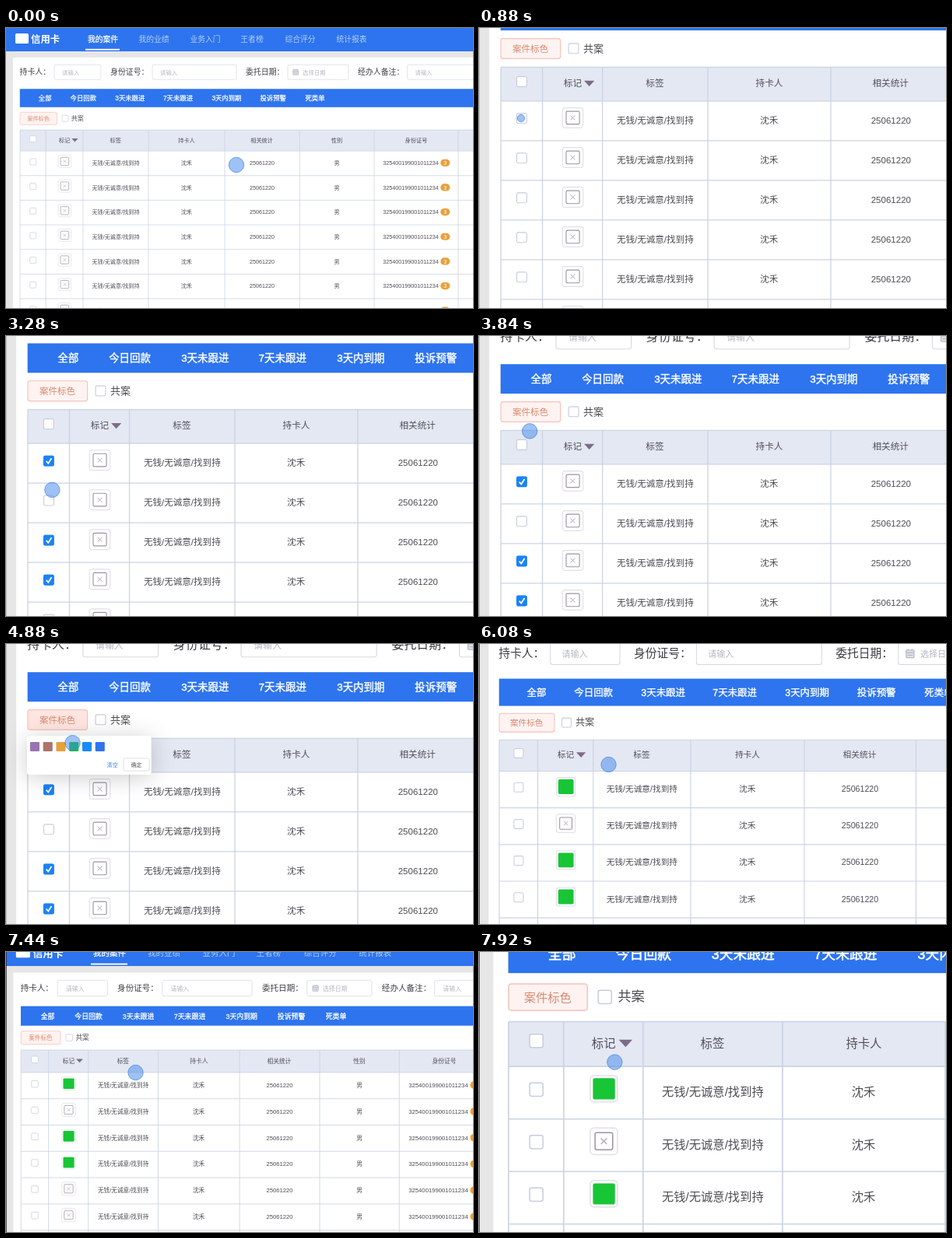
These frames come from a looping animation (600 by 360 pixels, 8 s). An HTML page:

```html
<!DOCTYPE html>
<html lang="zh-CN">
<head>
<meta charset="utf-8">
<style>
  html, body { margin: 0; width: 100%; height: 100%; overflow: hidden; background: #e6e6e6; }
  svg { display: block; width: 600px; height: 360px; }
  text { font-family: "Liberation Sans", "Noto Sans CJK SC", "Noto Sans CJK", sans-serif; white-space: pre; }
  #popup { filter: drop-shadow(0 2px 9px rgba(0, 0, 0, .2)); }
</style>
</head>
<body>
<svg id="stage" viewBox="0 0 600 360"></svg>
<script>
const LOOP = 8000, STEP = 80;
const BLUE = '#2d74ee', LINE = '#cbd3e4', GREEN = '#18c536';
const COLS = [18, 51.2, 99, 183, 281, 377.3, 473, 581];
const HEAD = 131.1, BODY = 158.1, ROW = 31.65, ROWS = 7;
const CHECKED = { 0: 900, 2: 2000, 3: 2680 };
const POPUP_OPEN = 4100, CONFIRM = 5860;

// Markup helpers
const rect = (x, y, w, h, fill, more = '') =>
  `<rect x="${x}" y="${y}" width="${w}" height="${h}" fill="${fill}" ${more}/>`;
const box = (x, y, w, h, r, stroke, fill = '#fff', sw = .7) =>
  rect(x, y, w, h, fill, `rx="${r}" stroke="${stroke}" stroke-width="${sw}"`);
const path = (d, stroke, sw) => `<path d="${d}" fill="none" stroke="${stroke}" stroke-width="${sw}"/>`;
const label = (s, x, y, size, fill, anchor = 'start', more = '') =>
  `<text x="${x}" y="${y + size * .37}" font-size="${size}" fill="${fill}" text-anchor="${anchor}" ${more}>${s}</text>`;
const mid = (s, x, y, size, fill, more) => label(s, x, y, size, fill, 'middle', more);
// Medium weight: a regular face with a hairline outline
const medium = color => `stroke="${color}" stroke-width=".25"`;
const tickbox = (x, y) => box(x - 4, y - 4, 8, 8, 1.2, '#c6cddd');

function header() {
  const nav = [['我的案件', 124.5], ['我的业绩', 190], ['业务入门', 256], ['王者榜', 316], ['综合评分', 378], ['统计报表', 444]];
  return rect(0, 0, 600, 30, BLUE) + rect(12, 7, 17, 13, '#fff', 'rx="1.5"') +
    label('信用卡', 32, 14, 12.4, '#fff', 'start', 'font-weight="700"') +
    nav.map(([s, x], i) => mid(s, x, 14, 9.8, i ? '#b4cffa' : '#fff', i ? '' : medium('#fff'))).join('') +
    rect(102, 26.8, 44, 1.8, '#fff');
}

function filters() {
  const fields = [
    ['持卡人：', 17.5, 62, 60, '请输入', 72], ['身份证号：', 134, 188, 108, '请输入', 198],
    ['委托日期：', 308, 362, 78, '选择日期', 381], ['经办人备注：', 452, 515.5, 100, '请输入', 525.5]];
  return fields.map(([name, x, bx, w, hint, hx]) =>
    label(name, x, 55.9, 9.9, '#3c3c44') + box(bx, 47.2, w, 19, 2, '#d5d9e3') +
    label(hint, hx, 56.8, 7.4, '#b4b8c2')).join('') +
    box(368.8, 53.6, 6.8, 6.6, .6, '#b4b8c2', '#dfe2e8', .8) +
    path('M368.8 55.8h6.8M370.6 52.6v1.6M373.8 52.6v1.6M370 58h4.4', '#b4b8c2', .8);
}

function toolbar() {
  const tabs = [['全部', 50.2], ['今日回款', 99.3], ['3天未跟进', 159.3], ['7天未跟进', 221], ['3天内到期', 283.4], ['投诉预警', 343.2], ['死类单', 397]];
  return rect(17.8, 78.3, 590, 23.5, BLUE) +
    tabs.map(([s, x]) => mid(s, x, 90.1, 8.35, '#fff', medium('#fff'))).join('') +
    rect(18, 108.3, 47.5, 16, '#fff3f1', 'id="mark" rx="1.8" stroke="#f6c0b8" stroke-width=".7"') +
    mid('案件标色', 41.6, 116.4, 7.15, '#d88a70') +
    tickbox(76, 116.2) + label('共案', 83.7, 115.8, 8.1, '#4a4a50');
}

function row(i) {
  const y = BODY + i * ROW, ty = y + 15.2, c = '#4d4d55';
  const x0 = 75.4, y0 = y + 13.4;
  return tickbox(34.7, y + 13.9) +
    `<g id="on${i}">` + rect(30.4, y + 9.7, 8.6, 8.6, '#1a83f8', 'rx="1.4"') +
    path(`M32.7 ${y + 14.1}l1.6 1.8l2.6 -4`, '#fff', 1.1) + '</g>' +
    box(67.2, y + 5.4, 16.4, 16, 2.2, '#e0e0e8') +
    `<g id="empty${i}">` + box(70.1, y + 8.2, 10.6, 10.3, 1, '#9b93a3') +
    path(`M${x0 - 1.8} ${y0 - 1.8}l3.6 3.6m0 -3.6l-3.6 3.6`, '#a9a3ae', .6) + '</g>' +
    rect(68.8, y + 7.1, 13.3, 12.7, GREEN, `id="green${i}" rx="1.2"`) +
    mid('无钱/无诚意/找到持', 141, ty, 7.17, c) + mid('沈禾', 231.8, ty, 7.17, c) +
    mid('25061220', 329, ty, 7.15, c) + mid('男', 425, ty, 7.17, c) +
    mid('325400199001011234', 520, ty, 7.2, c) +
    rect(558.3, ty - 4.6, 12, 9.2, '#e8a03a', 'rx="4.6"') + mid('3', 564.3, ty, 7.2, '#fff');
}

function table() {
  const heads = [['标记', 75.3], ['标签', 140.8], ['持卡人', 232], ['相关统计', 328.6], ['性别', 425], ['身份证号', 527]];
  let out = rect(18, HEAD, 590, BODY - HEAD, '#e4e8f3');
  let lines = `M18 ${HEAD}H610`;
  for (let i = 0; i < ROWS; i++) lines += `M18 ${BODY + i * ROW}H610`;
  for (const x of COLS) lines += `M${x} ${HEAD}V380`;
  out += path(lines, LINE, .8) + tickbox(34.7, 142.6) +
    heads.map(([s, x]) => mid(s, x, 143.9, 7.2, '#4f4f59')).join('') +
    '<path d="M84.4 141.9h8.2l-4.1 4.5z" fill="#7d6c86"/>';
  for (let i = 0; i < ROWS; i++) out += row(i);
  return out;
}

function popup() {
  const colors = ['#9a73b1', '#aa766c', '#e6a13a', GREEN, '#1a8bfb', BLUE];
  return '<g id="popup">' + rect(17.4, 129, 99, 31, '#fff', 'rx="1.5"') +
    colors.map((c, i) => rect(19.8 + i * 10.4, 134, 7.5, 7.5, c, 'rx=".8"')).join('') +
    mid('清空', 85.4, 152, 4.4, '#2d86ee') + box(94.3, 147, 20.6, 10, 1.2, '#d5d9e3', '#fff', .5) +
    mid('确定', 104.6, 152, 4.3, '#55555f') + '</g>';
}

document.getElementById('stage').innerHTML =
  '<g id="page">' + rect(0, 0, 600, 400, '#e6e6e6') + header() + rect(8.8, 38, 600, 360, '#fff') +
  filters() + toolbar() + table() + popup() + '</g>' + rect(0, 0, 1, 360, '#222', 'id="edge"') +
  '<circle id="cursor" fill="#3f86ea" fill-opacity=".5" stroke="#3f82de" stroke-opacity=".7" stroke-width="1"/>';

// Tracks: [time, ...values]
const ZOOM = [[0, 1, 0], [720, 1.612, -1], [5880, 1.612, -1], [6560, 1, 0], [7350, 1, 0], [7920, 2.133, -.4]];
const PAN = [[0, 0], [720, -161], [2950, -161], [3520, -90], [5880, -90], [6560, 0], [7338, 0], [7920, -190]];
const POINTER = [[0, 296, 176], [780, 54, 116], [1000, 54, 116], [1880, 54, 218], [2080, 54, 218],
  [2560, 54, 268], [2760, 54, 268], [4020, 67, 98], [4120, 67, 98], [4980, 88, 131], [5290, 88, 131],
  [5760, 166.5, 155], [7450, 166.5, 155], [8080, 177, 137]];
const CLICKS = [880, 1960, 2640, 4080, 5080, 5840];

const linear = u => u;
const sine = u => (1 - Math.cos(Math.PI * u)) / 2;
function at(track, t, ease) {
  const i = track.findIndex(k => k[0] > t);
  if (i < 0) return track[track.length - 1].slice(1);
  const a = track[i - 1], b = track[i], u = ease((t - a[0]) / (b[0] - a[0]));
  return a.slice(1).map((v, j) => v + (b[j + 1] - v) * u);
}

const el = id => document.getElementById(id);
const set = (id, attrs) => { for (const k in attrs) el(id).setAttribute(k, attrs[k]); };

function draw(t) {
  const [s, x] = at(ZOOM, t, sine), [y] = at(PAN, t, sine), [cx, cy] = at(POINTER, t, linear);
  const press = Math.max(...CLICKS.map(c => 1 - Math.abs(t - c) / 100), 0);
  const done = t >= CONFIRM;
  set('page', { transform: `matrix(${s} 0 0 ${s} ${x} ${y})` });
  set('cursor', { cx, cy, r: 9.7 - 5 * press });
  set('edge', { opacity: t < STEP ? 0 : done ? .7 : .2 });
  const shown = done ? 0 : Math.min(1, Math.max(0, (t - POPUP_OPEN) / 160));
  set('popup', { opacity: shown });
  set('mark', { fill: shown ? '#ffe6e1' : '#fff3f1' });
  for (let i = 0; i < ROWS; i++) {
    const picked = i in CHECKED, green = picked && done;
    set('on' + i, { opacity: picked && t >= CHECKED[i] && !done ? 1 : 0 });
    set('green' + i, { opacity: green ? 1 : 0 });
    set('empty' + i, { opacity: green ? 0 : 1 });
  }
}

const start = performance.now();
function tick() {
  const t = (performance.now() - start) % LOOP;
  draw(Math.floor(t / STEP) * STEP);
  requestAnimationFrame(tick);
}
tick();
</script>
</body>
</html>
```
